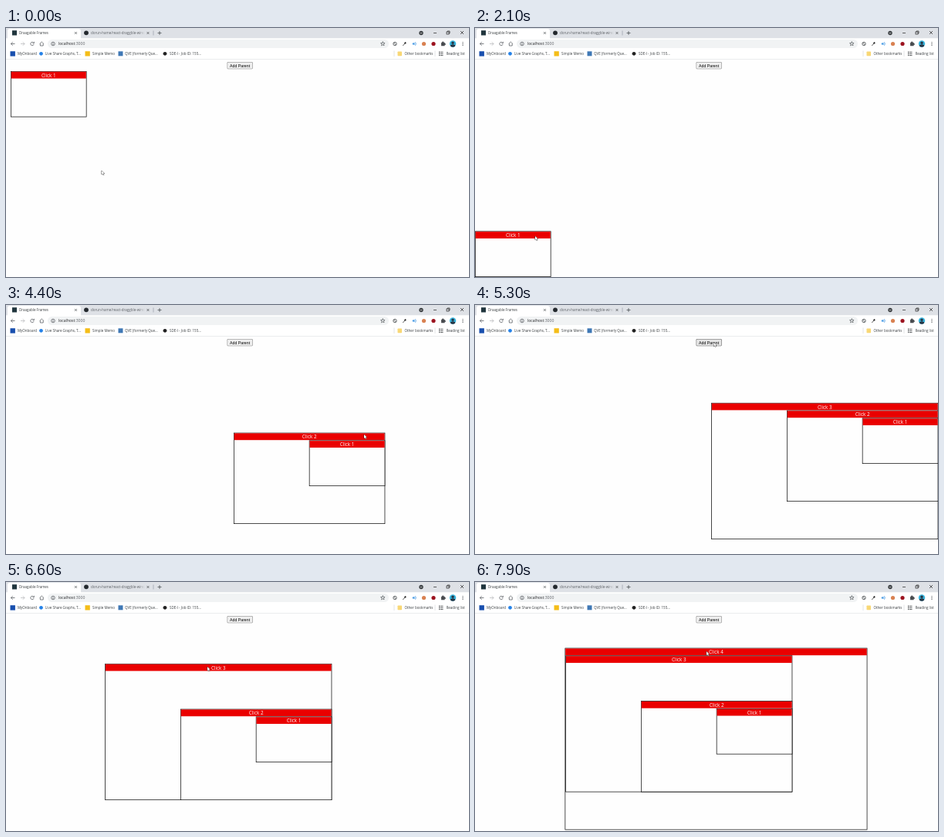
Write an HTML page with a canvas that moves like this. It is 600x323 px and loops after 8 s.

```html
<!DOCTYPE html>
<html lang="en">
<head>
<meta charset="utf-8">
<title>Draagable Frames</title>
<style>
  html, body { margin: 0; width: 100%; height: 100%; overflow: hidden; background: #fff; }
  canvas { display: block; }
</style>
</head>
<body>
<canvas id="stage" width="600" height="323"></canvas>
<script>
const ctx = document.getElementById('stage').getContext('2d');
const W = 600, H = 323, LOOP = 8000, STEP = 100;
const EDGE = 0.7, HEAD = 9.8, UNIT_W = 97.8, UNIT_H = 58.8;
const SANS = '"Open Sans", "Noto Sans", sans-serif';
const ARIAL = '"Liberation Sans", Arial, sans-serif';
const GREY = '#5f6368', INK = '#3c4043';

const clamp = (v, lo, hi) => Math.min(Math.max(v, lo), hi);
const boxW = n => UNIT_W * n + EDGE;
const boxH = n => UNIT_H * n + EDGE;

// Boxes are nested: box n + 1 holds box n, the last one sits on the page.
function fit(boxes, n, x, y) {
  const p = boxes[n];
  const [l, t, r, b] = p
    ? [p.x + EDGE, p.y + HEAD, p.x + boxW(n + 1), p.y + boxH(n + 1)]
    : [0, 41, W + 0.3, H];
  return { x: clamp(x, l, r - boxW(n)), y: clamp(y, t, b - boxH(n)) };
}

// Replays the mouse gestures up to time t.
function scene(t) {
  const mouse = { x: 124, y: 185 }, boxes = [{ x: 6, y: 56 }];

  function wait(ms) { t -= ms; }

  function move(ms, x, y, held) {
    if (t < 0) return;
    const k = Math.min(t / ms, 1);
    const dx = (x - mouse.x) * k, dy = (y - mouse.y) * k;
    mouse.x += dx;
    mouse.y += dy;
    t -= ms;
    if (!held) return;
    const box = boxes[held - 1];
    const to = fit(boxes, held, box.x + dx, box.y + dy);
    const sx = to.x - box.x, sy = to.y - box.y;
    for (const b of boxes.slice(0, held)) {
      b.x += sx;
      b.y += sy;
    }
  }

  function addParent(ms) {
    move(ms, 309.5, 48.5);
    wait(100);
    if (t >= 0) {
      const n = boxes.length, child = boxes[n - 1];
      boxes.push(fit(boxes, n + 1, child.x - EDGE, child.y - HEAD));
    }
    wait(100);
  }

  wait(200);
  move(600, 84, 60);
  wait(200);
  move(800, 86, 192, 1);
  move(300, 78, 270, 1);
  wait(100);
  addParent(400);

  move(200, 84, 268);
  move(400, 182, 223, 1);
  move(100, 182, 218, 1);
  move(200, 169, 207);
  move(700, 464, 168, 2);
  move(200, 573, 139, 2);
  wait(100);
  addParent(400);

  move(400, 490, 140);
  move(300, 490, 189, 2);
  move(250, 439, 131);
  move(350, 261, 110, 3);
  move(200, 250, 99.5, 3);
  wait(100);
  addParent(300);

  move(400, 300, 90);
  return { mouse, boxes };
}

function rect(x, y, w, h, color) {
  ctx.fillStyle = color;
  ctx.fillRect(x, y, w, h);
}

function round(x, y, w, h, r, color) {
  ctx.fillStyle = color;
  ctx.beginPath();
  ctx.roundRect(x, y, w, h, r);
  ctx.fill();
}

function dot(x, y, r, color) {
  ctx.fillStyle = color;
  ctx.beginPath();
  ctx.arc(x, y, r, 0, 7);
  ctx.fill();
}

function ring(x, y, r, color, from = 0, to = 7) {
  ctx.strokeStyle = color;
  ctx.beginPath();
  ctx.arc(x, y, r, from, to);
  ctx.stroke();
}

function line(color, ...pts) {
  ctx.strokeStyle = color;
  ctx.beginPath();
  for (let i = 0; i < pts.length; i += 2) ctx.lineTo(pts[i], pts[i + 1]);
  ctx.stroke();
}

function cross(x, y, r, color) {
  line(color, x - r, y - r, x + r, y + r);
  line(color, x - r, y + r, x + r, y - r);
}

function arrow(x, y, dir, color) {
  line(color, x - 2.5, y, x + 2.5, y);
  line(color, x + dir * 0.3, y - 2.3, x + dir * 2.6, y, x + dir * 0.3, y + 2.3);
}

function text(s, x, y, size, color, font = SANS, align = 'left') {
  ctx.font = size + 'px ' + font;
  ctx.textAlign = align;
  ctx.fillStyle = color;
  ctx.fillText(s, x, y);
}

function tabs() {
  rect(0, 0, W, 13.5, '#dee1e6');
  round(2, 1, 95, 14, [3, 3, 0, 0], '#fff');
  ctx.lineWidth = 0.7;
  rect(8, 3.2, 6, 6.3, '#20353d');
  text('Draagable Frames', 17, 8.2, 4.5, INK);
  cross(90.5, 6.5, 1.4, INK);
  dot(104, 6.3, 2.9, '#24292e');
  text('dorun-hame/react-draggble-windows', 110, 8.2, 4.5, GREY);
  const fade = ctx.createLinearGradient(172, 0, 180, 0);
  fade.addColorStop(0, '#dee1e600');
  fade.addColorStop(1, '#dee1e6');
  rect(172, 2, 30, 9, fade);
  cross(184, 6.5, 1.4, INK);
  line('#9aa0a6', 191, 3.5, 191, 9.5);
  line(INK, 196.5, 6.5, 201.5, 6.5);
  line(INK, 199, 4, 199, 9);
  dot(538, 6.5, 2.7, INK);
  line('#fff', 536.8, 6, 538, 7.2, 539.2, 6);
  line('#222', 554, 6.5, 558, 6.5);
  ctx.strokeStyle = '#222';
  ctx.strokeRect(571, 5, 3, 3);
  line('#222', 572, 4.9, 572, 4, 575, 4, 575, 7, 574, 7);
  cross(591, 6, 2, '#222');
}

function star(x, y) {
  ctx.beginPath();
  for (let i = 0; i < 10; i++) {
    const r = i % 2 ? 1.2 : 2.9, a = i * Math.PI / 5 - Math.PI / 2;
    ctx.lineTo(x + r * Math.cos(a), y + r * Math.sin(a));
  }
  ctx.closePath();
  ctx.lineWidth = 0.6;
  ctx.strokeStyle = INK;
  ctx.stroke();
}

function avatar(x, y) {
  ctx.save();
  ctx.beginPath();
  ctx.arc(x, y, 4.2, 0, 7);
  ctx.clip();
  rect(x - 5, y - 5, 10, 10, '#38b5de');
  dot(x, y - 1.2, 1.7, '#283543');
  dot(x, y + 4.5, 3.7, '#283543');
  ctx.restore();
}

function toolbar() {
  const y = 20.5;
  rect(0, 13.5, W, 26.5, '#fff');
  ctx.lineWidth = 0.8;
  arrow(9, y, -1, GREY);
  arrow(21.5, y, 1, '#babcbe');
  ring(34, y, 2.2, GREY, 0.3, 5.6);
  line(GREY, 36.4, 17.8, 36.4, 19.8, 34.4, 19.8);
  line(GREY, 43.6, 20.6, 46.3, 18, 49, 20.6);
  line(GREY, 44.4, 20.3, 44.4, 23, 48.2, 23, 48.2, 20.3);

  round(54, 15, 442, 11, 5.5, '#f1f3f4');
  ring(61, y, 2.3, GREY);
  line(GREY, 61, 20.2, 61, 22);
  rect(60.6, 18.8, 0.8, 0.8, GREY);
  text('localhost', 68, 22.4, 5.1, '#202124');
  text(':3000', 68 + ctx.measureText('localhost').width, 22.4, 5.1, GREY);
  star(488.3, y);

  ctx.lineWidth = 0.8;
  ring(504, y, 2.2, INK);
  line(INK, 502.5, 19, 505.5, 22);
  line('#333', 514.2, 23, 517.2, 20);
  ctx.lineWidth = 1.8;
  line('#222', 516.6, 20.2, 518.2, 18.6);
  dot(528, y, 1.3, '#4c9de4');
  ctx.lineWidth = 0.7;
  for (const r of [2, 3.3]) ring(528, y, r, '#4c9de4', -0.8, 0.8);
  dot(541.5, y, 2.6, '#d98252');
  dot(554, y, 2.6, '#9c1420');
  round(564, 18.8, 4.6, 4.4, 0.5, '#4a4d51');
  dot(566.2, 18.5, 1.1, '#4a4d51');
  dot(568.8, 21, 1.1, '#4a4d51');
  avatar(579, y);
  for (let i = -1; i < 2; i++) dot(592, y + i * 1.9, 0.65, GREY);
}

function bookmarks() {
  rect(5.5, 30.2, 6.4, 6.4, '#184fae');
  dot(45.5, 33.3, 2.4, '#2582e8');
  rect(102.5, 30.2, 6.3, 6.3, '#f4bd18');
  rect(145.5, 30.3, 6, 6, '#3f78b5');
  dot(206, 33.3, 2.4, '#222');
  const labels = {
    'MyOnboard': 15, 'Live Share Graphs, T...': 51, 'Simple Memo': 112,
    'QVE (formerly Que...': 154, 'SDE-I - Job ID: 155...': 212,
    'Other bookmarks': 516.5, 'Reading list': 570.5
  };
  for (const s in labels) text(s, labels[s], 35, 4.5, INK);
  ctx.lineWidth = 0.6;
  for (const x of [503, 556]) line('#d0d3d7', x, 29.5, x, 37);
  round(507.5, 30.6, 5.5, 5.6, 0.7, '#f8d775');
  for (let y = 30.6; y < 36; y += 2.1) {
    rect(561, y, 1.3, 1.3, INK);
    rect(563, y + 0.2, 3.5, 0.8, INK);
  }
  rect(0, 40, W, 0.6, '#dfe1e5');
}

function button({ x, y }) {
  const hover = x > 286 && x < 320 && y > 44 && y < 54;
  round(286.6, 44.1, 33.1, 9.2, 1.2, hover ? '#5c5c5c' : '#828282');
  round(287.1, 44.6, 32.1, 8.2, 0.8, hover ? '#e5e5e5' : '#efefef');
  text('Add Parent', 303.1, 50.5, 5.2, '#000', ARIAL, 'center');
}

function frame(n, { x, y }) {
  const w = boxW(n), h = boxH(n), inner = w - 2 * EDGE;
  rect(x, y, w, h, '#000');
  rect(x + EDGE, y + EDGE, inner, h - 2 * EDGE, '#fefefe');
  rect(x + EDGE, y + EDGE, inner, HEAD - 2 * EDGE + 0.4, '#ea0000');
  text('Click ' + n, x + w / 2, y + 7.7, 6.3, '#fff', SANS, 'center');
}

function pointer({ x, y }) {
  const shape = [0, 0, 0, 5, 1.2, 4, 2, 5.8, 2.9, 5.4, 2.1, 3.6, 3.6, 3.6];
  ctx.beginPath();
  for (let i = 0; i < shape.length; i += 2) ctx.lineTo(x + shape[i], y + shape[i + 1]);
  ctx.closePath();
  ctx.lineWidth = 0.8;
  ctx.strokeStyle = '#222';
  ctx.stroke();
  ctx.fillStyle = '#fff';
  ctx.fill();
}

function draw(t) {
  const { mouse, boxes } = scene(t);
  rect(0, 0, W, H, '#fefefe');
  tabs();
  toolbar();
  bookmarks();
  button(mouse);
  for (let n = boxes.length; n > 0; n--) frame(n, boxes[n - 1]);
  pointer(mouse);
}

const start = performance.now();
function tick() {
  const t = (performance.now() - start) % LOOP;
  draw(Math.floor(t / STEP) * STEP);
  requestAnimationFrame(tick);
}
tick();
</script>
</body>
</html>
```
